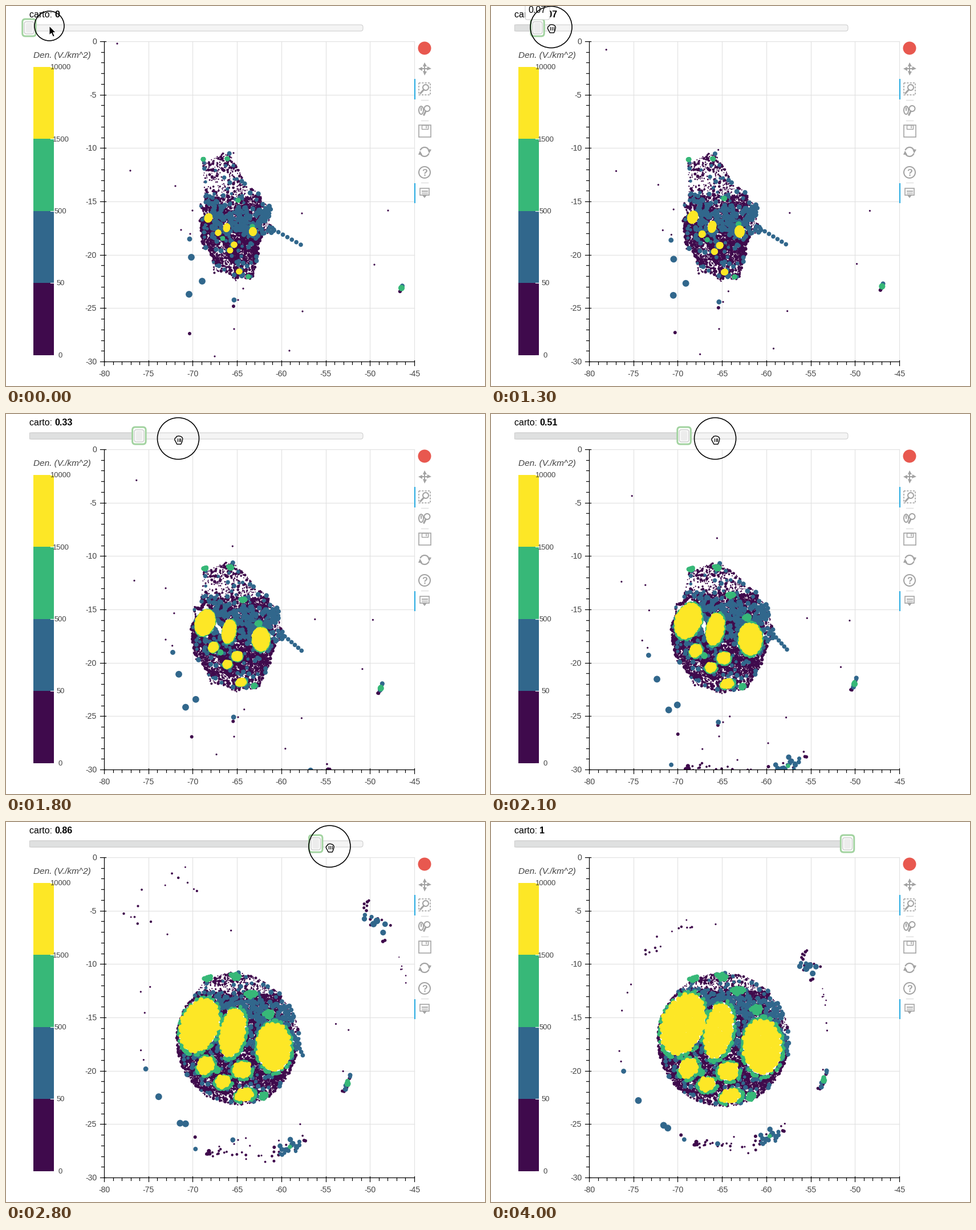
A matplotlib script that plays this animation: 840x667 px, repeating every 4.1 s.

```python
import numpy as np
import matplotlib.pyplot as plt
from matplotlib.animation import FuncAnimation
from matplotlib.patches import Arc, Circle, Ellipse, FancyBboxPatch, Polygon, Rectangle

W, H, DPI = 840, 667, 100
PT = 72 / DPI
PURPLE, BLUE, GREEN, YELLOW = "#3f0a4c", "#31678c", "#37b878", "#fde726"
GREY, INK = "#a3a3a3", "#444444"
LEFT, RIGHT, TOP, BOTTOM = 172, 716, 62, 624

plt.rcParams["font.family"] = "Liberation Sans"
rng = np.random.default_rng(11)
fig = plt.figure(figsize=(W / DPI, H / DPI), dpi=DPI, facecolor="white")
ax = fig.add_axes([0, 0, 1, 1])
ax.set(xlim=(0, W), ylim=(H, 0))
ax.axis("off")
ax.autoscale(False)


def line(xs, ys, color="black", w=1, z=2, **kw):
    return ax.plot(xs, ys, color=color, lw=w * PT, zorder=z, **kw)[0]


def text(x, y, s, size, color=INK, z=5, **kw):
    return ax.text(x, y, s, fontsize=size * PT, color=color, zorder=z, va="baseline", **kw)


def add(patch, z=3):
    patch.set_zorder(z)
    return ax.add_patch(patch)


def box(x, y, w, h, r, fc, ec, lw=1, z=6):
    style = f"round,pad=0,rounding_size={r}"
    return add(FancyBboxPatch((x, y), w, h, boxstyle=style, fc=fc, ec=ec, lw=lw * PT), z)


# ---- plot frame, axes and colour bar ----
def draw_axes():
    for i in range(36):
        x = LEFT + (RIGHT - LEFT) * i / 35
        if i % 5 == 0:
            line([x, x], [TOP, BOTTOM], "#e2e2e2", 1.2, 1)
            text(x, 650, str(i - 80), 14, ha="center")
        line([x, x], [BOTTOM - 2.5, BOTTOM + 7] if i % 5 == 0 else [BOTTOM, BOTTOM + 5], w=1.2, z=5)
    for i in range(31):
        y = TOP + (BOTTOM - TOP) * i / 30
        if i % 5 == 0:
            line([LEFT, RIGHT], [y, y], "#e2e2e2", 1.2, 1)
            text(159, y + 5, str(-i), 14, ha="right")
        line([LEFT - 7, LEFT + 2.5] if i % 5 == 0 else [LEFT - 5, LEFT], [y, y], w=1.2, z=5)
    line([LEFT, LEFT], [TOP, BOTTOM], w=1.2, z=5)
    line([LEFT, RIGHT], [BOTTOM, BOTTOM], w=1.2, z=5)


def draw_colorbar():
    text(48, 91, "Den. (V./km^2)", 15.4, style="italic")
    edges = np.linspace(106.5, 612.5, 5)
    for y, color in zip(edges, (YELLOW, GREEN, BLUE, PURPLE)):
        add(Rectangle((48, y), 35.5, 126.5, fc=color, ec="none"))
    for y, label in zip(edges, ("10000", "1500", "500", "50", "0")):
        line([78, 83.5], [y, y], "white", 1.2, 4)
        text(95.5, y + 4.5, label, 13, ha="center")


# ---- toolbar ----
def draw_toolbar():
    cx = 734

    def ring(x, y, r, w=2):
        add(Circle((x, y), r, fc="none", ec=GREY, lw=w * PT))

    def frame(x, y, w, h, lw=1.6, ls="-"):
        add(Rectangle((x, y), w, h, fc="none", ec=GREY, lw=lw * PT, ls=ls))

    def head(x, y, m):
        line([x], [y], GREY, marker=m, ms=7 * PT, mew=0)

    add(Circle((cx, 74), 11.5, fc="#e8584f", ec="none"))
    line([cx - 8, cx + 8], [110, 110], GREY, 2)
    line([cx, cx], [102, 118], GREY, 2)
    for dx, dy, m in ((0, -8, "^"), (0, 8, "v"), (-8, 0, "<"), (8, 0, ">")):
        head(cx + dx, 110 + dy, m)
    frame(724, 135, 20, 21, 1.6, (0, (2, 1.3)))
    ring(736, 143, 5)
    line([732.5, 727], [147, 153], GREY, 3)
    add(Ellipse((728, 183), 8, 14, fc="none", ec=GREY, lw=2 * PT))
    line([728, 728], [179, 183], GREY, 2)
    ring(738.5, 180, 5)
    line([736, 733], [185, 191], GREY, 3)
    frame(723.5, 209, 21, 21)
    frame(729, 209, 11, 7, 1.4)
    line([737, 737], [211, 214], GREY, 1.5)
    for a in (20, 200):
        add(Arc((cx, 256), 16, 16, theta1=a, theta2=a + 125, ec=GREY, lw=2.2 * PT))
    head(742, 255, "v")
    head(726, 257, "^")
    ring(cx, 292, 10)
    text(cx, 297.5, "?", 16, GREY, ha="center", weight="bold")
    frame(726, 320, 16, 12)
    for y in (323.5, 326, 328.5):
        line([729, 739], [y, y], GREY, 1.2)
    add(Polygon([(730, 332), (738, 332), (734, 337)], fc=GREY, ec="none"))
    for y in (165, 201, 310):
        line([728, 740], [y, y], "#dcdcdc", 1.3)
    for y in (128, 310.5):
        add(Rectangle((716, y), 2, 35.5, fc="#26aae1", ec="none"), 6)


# ---- the map: every dot slides straight from its true place to its swollen one ----
MID, RADII = np.array([407, 382]), np.array([114, 116])

# start, end, half axes, tilt
CITIES = [
    ((355, 372), (337, 354.5), 39, 59, 20),
    ((387, 389), (399.5, 366), 26, 53, 11),
    ((433, 396), (475.5, 394), 36, 52, 0),
    ((400, 419), (416, 437.5), 20, 18, 0),
    ((372, 398), (346, 431.5), 17, 21, 35),
    ((393, 429), (379, 460), 18, 13, -15),
    ((409, 466), (420, 481), 21, 13, -15),
]
MARKETS = [
    ((346, 269), (355, 275), 9, 3, -15),
    ((388, 268), (405, 271), 10, 5, 15),
    ((407, 341), (433, 296), 13, 6, 0),
    ((432, 387), (466, 329), 11, 9, 0),
    ((425, 475), (456, 482), 8, 5, -30),
    ((380, 408), (368, 440), 4, 5, 0),
]
# True border for every 30 degrees of the swollen disc, clockwise from east
BORDER = [(475, 396), (442, 435), (432, 475), (403, 482), (365, 468), (345, 425),
          (339, 378), (339, 345), (346, 274), (390, 257), (415, 305), (465, 355)]
INNER = [((395, 305), (372, 350)), ((440, 315), (413, 368)), ((478, 318), (445, 366))]


def polar(angle, r=1.0):
    return np.c_[r * np.cos(angle), r * np.sin(angle)]


def turn(p, deg):
    c, s = np.cos(np.radians(deg)), np.sin(np.radians(deg))
    return p @ np.array([[c, s], [-s, c]])


def oval(city, angle, scale=1.0):
    return turn(polar(angle, scale) * city[2:4], city[4])


def free(p, scale=0.97):
    ok = np.hypot(*((p - MID) / RADII).T) < 1.02
    for city in CITIES:
        ok &= np.hypot(*(turn(p - city[1], -city[4]) / city[2:4]).T) > scale
    return p[ok]


def make_unswell():
    knots = [MID + polar(np.arange(12) * np.pi / 6) * RADII]
    goals = [np.array(BORDER)]
    knots.append(np.array([b for b, _ in INNER] + [m[1] for m in MARKETS]))
    goals.append(np.array([a for _, a in INNER] + [m[0] for m in MARKETS]))
    for city in CITIES:
        off = oval(city, np.arange(8) * np.pi / 4)
        knots.append(off + city[1])
        goals.append(off * 0.12 + city[0])
    knots, goals = np.vstack(knots), np.vstack(goals)
    n = len(knots)

    def kernel(p):
        return np.hypot(p[:, None, 0] - knots[:, 0], p[:, None, 1] - knots[:, 1])

    flat = np.c_[np.ones(n), knots / 100]
    m = np.block([[kernel(knots) - 0.5 * np.eye(n), flat], [flat.T, np.zeros((3, 3))]])
    coef = np.linalg.solve(m, np.vstack([goals, np.zeros((3, 2))]))
    return lambda p: np.c_[kernel(p), np.ones(len(p)), p / 100] @ coef


unswell = make_unswell()
layers = {c: [] for c in (PURPLE, BLUE, GREEN, YELLOW)}


def put(color, a, b, r):
    layers[color].append(np.c_[a, b, np.broadcast_to(r, len(b))])


def add_villages():
    n = 11500
    p = free(MID + polar(rng.uniform(0, 2 * np.pi, n), np.sqrt(rng.random(n)) * 1.01) * RADII)
    x, y = unswell(p).T
    # Dense highlands, thin lowlands to the north and east
    keep = np.where((y < 334) | (x > 448), 0.28, np.where(y > 452, 0.6, 1.0))
    keep[y < 290] = 0.75
    belt = np.exp(-((y - 368) / 22) ** 2) * (x > 360)
    luck = rng.random(len(p))
    blue = luck < 0.02 + 0.16 * belt
    dark = ~blue & (rng.random(len(p)) < keep)
    r = np.clip(0.95 + rng.exponential(0.65, len(p)), 0, 3.2)
    r[keep < 1] *= 0.85
    a = np.c_[x, y]
    put(PURPLE, a[dark], p[dark], r[dark])
    put(BLUE, a[blue], p[blue], rng.uniform(2.6, 4.6, blue.sum()))
    # Road of towns leading east
    k = np.linspace(0, 1, 8)
    put(BLUE, np.c_[462 + 55 * k, 388 + 31 * k], np.c_[508 + 13 * k, 365 + 43 * k], 3.8)


def add_cities():
    def fill(color, city, n, r, inset):
        k = np.arange(n)
        off = oval(city, k * 2.39996, np.sqrt((k + 0.5) / n) * inset)
        off += rng.normal(0, 0.9, (n, 2))
        put(color, off * 0.075 + city[0], off + city[1], r)

    for city in MARKETS:
        fill(GREEN, city, 20, 3.9, 0.9)
    for city in CITIES:
        a, b = city[2:4]
        n = int(a + b)
        off = oval(city, rng.uniform(0, 2 * np.pi, n), rng.uniform(0.94, 1.05, n)) + (1, 1.5)
        put(GREEN, off * 0.065 + city[0], off + city[1], 3.5)
        fill(YELLOW, city, int(a * b / 11) + 8, 4.5, 1 - 4.2 / np.sqrt(a * b))


# ---- far places: all end on one ring, each in its own direction ----
def ring(angle):
    return 183 + 20 * np.clip(-np.sin(angle), 0, 1) ** 2


def add_far(color, points, r):
    p = np.array(points, float)
    angle = np.arctan2(*(p - MID).T[::-1])
    put(color, p, MID + polar(angle, ring(angle)), r)


def add_swarm(color, deg, spread, n, far, r, squeeze=1.0, depth=5):
    angle = np.radians(deg + spread * rng.uniform(-1, 1, n))
    origin = np.radians(deg) + (angle - np.radians(deg)) * squeeze
    drift = rng.normal(0, depth, n)
    a = MID + polar(origin, far + drift * squeeze)
    put(color, a, MID + polar(angle, ring(angle) + 7 + drift), r * rng.uniform(0.75, 1.25, n))


def add_outliers():
    add_far(PURPLE, [(195, 66), (218, 289), (297, 316), (307, 393), (327, 359), (323, 400),
                     (366, 615), (400, 567), (407, 516), (416, 496), (497, 605), (520, 536),
                     (646, 454), (670, 359), (519, 364), (399, 258)], 1.6)
    add_far(PURPLE, [(322, 575), (399, 527)], 3)
    add_far(BLUE, [(322, 409), (400, 516)], 4.4)
    add_far(BLUE, [(325, 441), (344, 483), (321, 506)], 5.9)
    # East
    add_swarm(BLUE, 21, 5, 5, 308, 3.8, 0.05, 2)
    add_swarm(PURPLE, 22, 6, 6, 308, 2.6, 0.15, 2)
    add_swarm(GREEN, 21.5, 1, 3, 308, 4.6, 0.05, 1)
    # North arc, north-east, south
    add_swarm(PURPLE, -113, 21, 14, rng.uniform(560, 950, 14), 1.8)
    add_swarm(BLUE, -41, 5, 7, 1060, 4.8, depth=8)
    add_swarm(PURPLE, -41, 7, 14, 1060, 2.4, depth=10)
    add_swarm(PURPLE, -23, 6, 6, 1060, 1.2, depth=3)
    add_swarm(BLUE, 63, 7, 20, 335, 3.8)
    add_swarm(PURPLE, 65, 9, 13, 335, 2.4, depth=8)
    add_swarm(GREEN, 65, 1, 1, 341, 3.8)
    add_swarm(PURPLE, 90, 13, 17, 302, 1.9, depth=7)
    add_swarm(PURPLE, 104, 1.5, 5, 309, 3.4, depth=2)
    add_swarm(BLUE, 111, 1, 1, 318, 4)


draw_axes()
draw_colorbar()
draw_toolbar()
add_villages()
add_cities()
add_outliers()

dots = np.vstack([part for parts in layers.values() for part in parts])
tones = [c for c, parts in layers.items() for part in parts for _ in part]
start, end = dots[:, :2], dots[:, 2:4]
cloud = ax.scatter(start[:, 0], start[:, 1], s=(2 * dots[:, 4] * PT) ** 2, c=tones,
                   linewidths=0, zorder=4)
window = add(Rectangle((LEFT, TOP), RIGHT - LEFT, BOTTOM - TOP, fc="none", ec="none"), 1)
cloud.set_clip_path(window)

# ---- slider and pointer ----
text(41, 20.5, "carto: ", 16, "black")
value = text(85.4, 20.5, "0", 16, "black", weight="bold")
box(41.5, 33, 584.5, 11, 4, "#f4f4f4", "#cccccc")
done = box(41.5, 33, 1, 11, 0.4, "#dfe0e0", "#cccccc")
halo = box(29, 23, 23.5, 30, 5, "white", "#a2d3a0", 3, 7)
knob = box(32, 27.5, 17, 21.5, 4, "#f7f7f7", "#c8c8c8", 1.2, 8)
groove = box(35, 30, 11, 16.5, 3, "#ececec", "none", 0, 9)
tip = box(60, -12, 43, 36, 4, "white", "#cccccc", 1, 10)
tip_text = text(81, 12, "", 16, "black", 11, ha="center")
press = add(Circle((0, 0), 26, fc="none", ec="black", lw=1.6 * PT), 12)

ARROW = np.array([(0, 0), (0, 16), (3.7, 12.7), (6.4, 19), (9.2, 17.8), (6.5, 11.6), (11.3, 11.6)])
HAND = np.array([(-7, 0), (-6.5, -3), (-4.5, -4), (-4, -6), (-2, -6.5), (0, -7), (2, -6.5),
                 (4, -6), (6, -4.5), (7, -2), (6, 3), (4, 7.5), (-3, 7.5), (-5, 3.5)])
arrow = add(Polygon(ARROW, fc="black", ec="white", lw=1 * PT), 13)
hand = add(Polygon(HAND, fc="white", ec="black", lw=1.4 * PT, joinstyle="round"), 13)
FINGER_X = np.array([-2, -2, np.nan, 0.8, 0.8, np.nan, 3.6, 3.6])
FINGER_Y = np.array([-3, 2, np.nan, -3, 2, np.nan, -3, 2])
fingers = line([], [], w=1.2, z=14)

# ms, pointer x, pointer y, slider value
KEYS = np.array([(0, 76, 35, 0), (700, 56, 35, 0), (900, 45, 38, 0), (1100, 62, 37, 0),
                 (1300, 105.5, 37, 0.07), (1800, 302, 43, 0.33), (2500, 514.5, 43, 0.76),
                 (3200, 638, 42.5, 1)]).T


def draw(i):
    ms = i * 100
    px, py, t = (float(np.interp(ms, KEYS[0], row)) for row in KEYS[1:])
    t = round(t, 2)
    cloud.set_offsets(start + (end - start) * t)

    x = 40.5 + 584.5 * t
    value.set_text(f"{t:g}")
    done.set_width(max(x - 41.5, 1))
    halo.set_x(x - 11.75)
    knob.set_x(x - 8.5)
    groove.set_x(x - 5.5)
    hover = 900 <= ms <= 1400
    tip.set_visible(hover)
    tip.set_x(x - 21.5)
    tip_text.set_visible(hover)
    tip_text.set_text(f"{t:g}")
    tip_text.set_x(x)

    drag = 900 <= ms <= 3400
    press.set_visible(drag or ms == 0)
    press.center = (px, py)
    press.set_radius(26 if ms in (0, 900, 3400) else 36.5)
    arrow.set_visible(not drag and ms < 3600)
    arrow.set_xy(ARROW + (px, py))
    hand.set_visible(drag)
    hand.set_xy(HAND + (px + 0.8, py + 2.5))
    fingers.set_visible(drag)
    fingers.set_data(FINGER_X + px + 0.8, FINGER_Y + py + 2.5)
    return cloud,


anim = FuncAnimation(fig, draw, frames=41, interval=100, repeat=True, blit=False)
plt.show()
```
